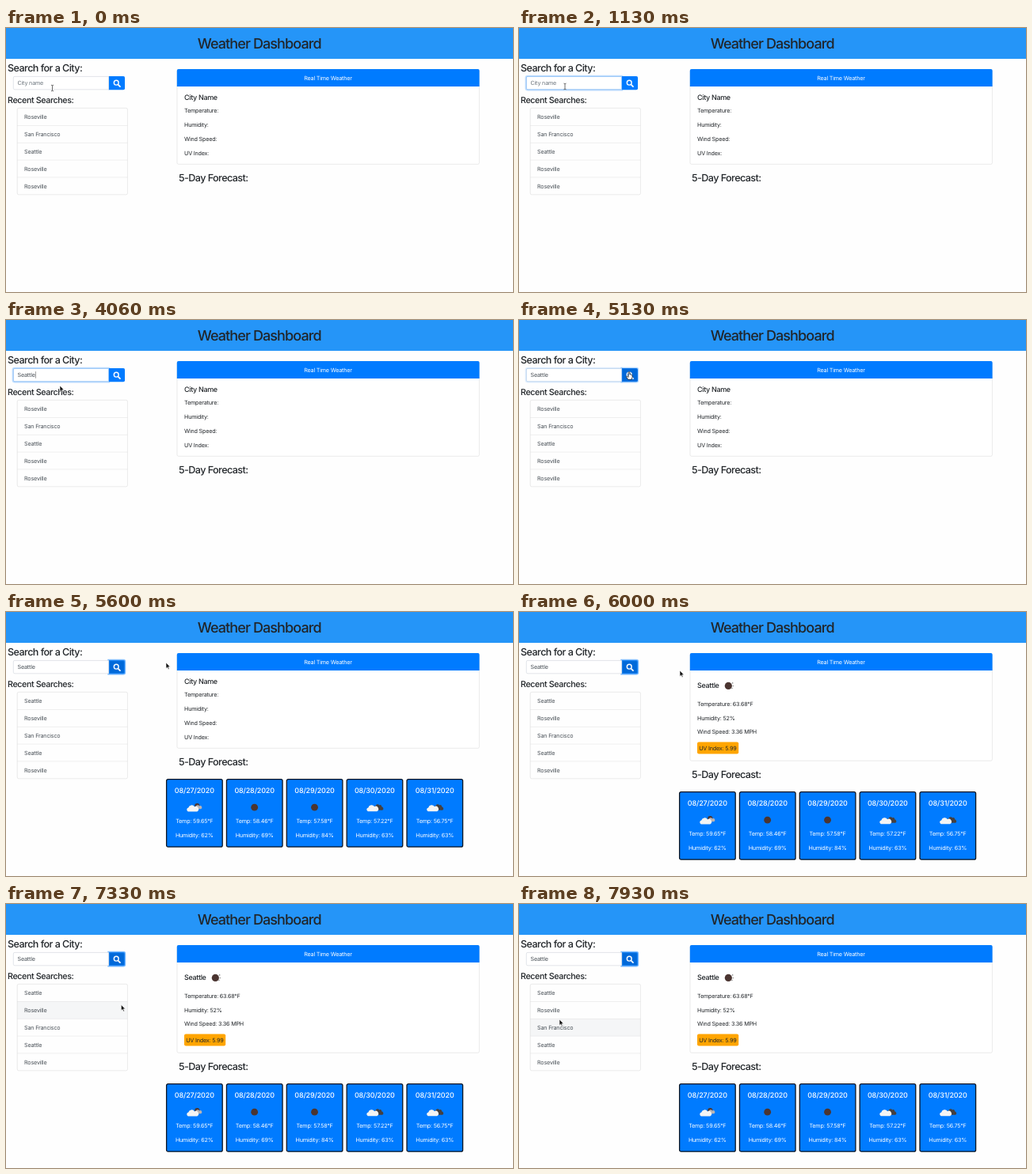
Animation of 640 by 334 pixels, one loop 8000 ms. Source, as an HTML page:

```html
<!DOCTYPE html>
<html lang="en">
<head>
<meta charset="utf-8">
<title>Weather Dashboard</title>
<style>
html, body { margin: 0; width: 100%; height: 100%; overflow: hidden; background: #fefefe; }
svg { display: block; width: 100vw; height: 100vh; }
text {
  font-family: Inter, "Open Sans", sans-serif;
  font-optical-sizing: none;
  text-rendering: geometricPrecision;
  white-space: pre;
}
.h1 { font-size: 18px; font-weight: 500; letter-spacing: -.05em; }
.h3 { font-size: 12.57px; font-weight: 500; letter-spacing: -.044em; }
.h4 { font-size: 10.78px; font-weight: 500; letter-spacing: -.04em; }
.h5 { font-size: 8.98px; font-weight: 500; letter-spacing: -.037em; }
.date { font-size: 8.98px; font-weight: 500; letter-spacing: -.015em; }
.body { font-size: 7.19px; letter-spacing: -.027em; }
</style>
</head>
<body>
<svg id="stage" viewBox="0 0 640 334"></svg>
<script>
const LOOP = 8000;
const FOCUS_INPUT = 160, HIDE_MOUSE = 2260, SHOW_MOUSE = 4060;
const CLICK = 5050, LIST_UPDATE = 5260, FORECAST = 5460, CURRENT = 5700;
const KEYS = [2260, 2600, 2800, 2930, 3260, 3460, 3600];
const CITY = 'Seattle';
const BLUE = '#007bff', INK = '#212529', GREY = '#495057', BROWN = '#4b3531';

const RECENT = ['Roseville', 'San Francisco', 'Seattle', 'Roseville', 'Roseville'];
const RECENT_AFTER = [CITY, ...RECENT.slice(0, 4)];
const DAYS = [
  ['08/27/2020', 'partly', '59.65', 62],
  ['08/28/2020', 'clear', '58.46', 69],
  ['08/29/2020', 'clear', '57.58', 84],
  ['08/30/2020', 'cloudy', '57.22', 63],
  ['08/31/2020', 'cloudy', '56.75', 63],
];

// Pointer path: time, x, y
const PATH = [
  [0, 58.5, 76], [60, 58.5, 76], [460, 57, 73], [4060, 68, 83], [4260, 70, 87],
  [4460, 73, 87], [4600, 76, 86], [4900, 133, 70], [5000, 139, 66], [5330, 139, 66],
  [5600, 202, 64], [6000, 203, 74], [6260, 196, 93], [6660, 178.5, 115],
  [7130, 163, 124], [7930, 51, 146], [8000, 51, 146],
];

const clamp = v => Math.max(0, Math.min(1, v));
const ease = v => v * v * (3 - 2 * v);
const fade = (t, start) => ease(clamp((t - start) / 150));

function pointerAt(t) {
  const i = Math.max(1, PATH.findIndex(p => p[0] > t));
  const [a, b] = [PATH[i - 1], PATH[i]];
  const k = ease(clamp((t - a[0]) / (b[0] - a[0])));
  return { x: a[1] + (b[1] - a[1]) * k, y: a[2] + (b[2] - a[2]) * k };
}

const inside = (p, x, y, w, h) => p.x >= x && p.x < x + w && p.y >= y && p.y < y + h;
const text = (cls, x, y, s, fill = INK, anchor = 'start') =>
  `<text class="${cls}" x="${x}" y="${y}" fill="${fill}" text-anchor="${anchor}">${s}</text>`;
const rect = (x, y, w, h, fill, more = '') =>
  `<rect x="${x}" y="${y}" width="${w}" height="${h}" fill="${fill}" ${more}/>`;
const path = (d, more) => `<path d="${d}" ${more}/>`;
const at = (x, y, s) => `<g transform="translate(${x} ${y})">${s}</g>`;

const cloud = fill => path('M-6 4A2.5 2.5 0 0 1-5.5-.8 4.2 4.2 0 0 1 2.2-2 3.2 3.2 0 0 1 5.5 4Z', `fill="${fill}"`);
const ball = r => `<circle r="${r}" fill="${BROWN}"/>`;
const small = (x, y, s) => `<g transform="translate(${x} ${y}) scale(.62)">${s}</g>`;
const ICONS = {
  clear: ball(4.4),
  partly: small(3.5, -2.2, ball(5)) + small(5, -.5, cloud('#b9b4b4')) + at(-2, 1.2, cloud('#f4f4f4')),
  cloudy: small(4.5, -1.5, cloud('#45403f')) + small(6.5, 1, cloud('#45403f')) + at(-2.5, 1, cloud('#f4f4f4')),
};

const CURSORS = {
  arrow: path('M0 0V7.4L1.7 5.9 2.9 8.5 4.1 8 2.9 5.4H5.2Z', 'fill="#111" stroke="#fff" stroke-width=".6"'),
  beam: path('M-1.5-3.8Q0-3.8 0-2.8Q0-3.8 1.5-3.8M0-2.8V2.8M-1.5 3.8Q0 3.8 0 2.8Q0 3.8 1.5 3.8',
    'fill="none" stroke="#444" stroke-width=".8"'),
  hand: path('M-.9 0Q0-1.1.9 0V3Q2 2.4 2.5 3.3 3.6 2.9 4 4V6.5L3 9.3H-1.3L-3.7 5.8Q-3.3 4.6-2 5.5L-.9 6.4Z',
    'fill="#fff" stroke="#111" stroke-width=".7"'),
};

function caretOn(t) {
  const last = KEYS.filter(k => k <= t).pop() ?? FOCUS_INPUT;
  return t >= FOCUS_INPUT && t < CLICK && (t - last) % 1000 < 500;
}

function searchBox(t, pointer) {
  const typed = CITY.slice(0, KEYS.filter(k => k <= t).length);
  const inputFocus = fade(t, FOCUS_INPUT) * (1 - fade(t, CLICK));
  const buttonFocus = fade(t, CLICK);
  const hover = inside(pointer, 129.5, 61, 20.5, 17);
  const button = 'M129.5 61H148.2Q150 61 150 62.8V76.4Q150 78.2 148.2 78.2H129.5Z';
  const field = 'M129.5 61.4H11Q9.3 61.4 9.3 63V76.2Q9.3 77.8 11 77.8H129.5Z';
  const caret = caretOn(t) ? '<tspan fill="#222" dx="-.5" font-weight="300">|</tspan>' : '';
  return path(button, `fill="${t >= CLICK || hover ? '#0069d9' : BLUE}"`)
    + path(button, `fill="none" stroke="#268fff" stroke-width="2.4" opacity="${buttonFocus * .6}"`)
    + path('M142 72.2L144 74.2', 'stroke="#fff" stroke-width="1.7" stroke-linecap="round"')
    + '<circle cx="139.2" cy="69.2" r="2.9" fill="none" stroke="#fff" stroke-width="1.4"/>'
    + path(field, `fill="#fff" stroke="${BLUE}" stroke-width="3.3" stroke-opacity="${inputFocus * .25}"`)
    + path(field, 'fill="#fff" stroke="#ced4da" stroke-width=".6"')
    + path(field, `fill="none" stroke="#80bdff" stroke-width=".7" opacity="${inputFocus}"`)
    + (typed ? text('body', 14.5, 72.4, typed + caret, GREY)
      : text('body', 14.5, 72.4, 'City name', '#6c757d')
        + (caret ? rect(14.2, 66, .5, 7.5, '#222') : ''));
}

function recentList(t, pointer) {
  const step = 21.9, top = 101.3;
  return (t < LIST_UPDATE ? RECENT : RECENT_AFTER).map((city, i) => {
    const y = top + i * step;
    const hover = t >= SHOW_MOUSE && inside(pointer, 14, y, 139.5, step);
    return (hover ? rect(14, y, 139.5, step, '#f5f6f7') : '')
      + (i ? rect(14, y - .2, 139.5, .5, '#dfdfdf') : '')
      + text('body', 23, y + 14, city, GREY);
  }).join('') + rect(14.2, top, 139.2, 5 * step, 'none', 'rx="1.8" stroke="#dcdcdc" stroke-width=".6"');
}

function currentWeather(loaded) {
  const rows = loaded
    ? ['Temperature: 63.68°F', 'Humidity: 52%', 'Wind Speed: 3.36 MPH']
    : ['Temperature:', 'Humidity:', 'Wind Speed:', 'UV Index:'];
  const first = loaded ? 118.7 : 107.2;
  const head = loaded
    ? text('h5', 225, 96.3, CITY)
      + at(264.3, 93.4, ball(4.6) + path('M4.5-3.5h1.5M5.5.2h1M4.2 3h1', 'stroke="#555" stroke-width="1"'))
      + rect(225, 164.4, 52.2, 15, '#ffa500', 'rx="2"') + text('body', 227.2, 174.5, 'UV Index: 5.99')
    : text('h5', 225, 91.4, 'City Name');
  return rect(216, 52.3, 381.4, loaded ? 135.9 : 120, '#fff', 'rx="1.8" stroke="#dcdcdc" stroke-width=".6"')
    + path('M215.8 74V54Q215.8 52 217.8 52H595.6Q597.6 52 597.6 54V74Z', `fill="${BLUE}"`)
    + text('body', 406.5, 65.6, 'Real Time Weather', '#fff', 'middle')
    + head + rows.map((row, i) => text('body', 225, first + i * 17.85, row)).join('');
}

function forecast(t) {
  if (t < FORECAST) return '';
  return DAYS.map(([date, icon, temp, humidity], i) => at(202 + i * 75.85, 211,
    rect(.6, .6, 70.6, 85.6, BLUE, 'rx="2" stroke="#0b1420" stroke-width="1.3"')
    + text('date', 35.8, 18.3, date, '#fff', 'middle')
    + at(35.8, 36.2, ICONS[icon])
    + text('body', 35.8, 56.3, `Temp: ${temp}°F`, '#fff', 'middle')
    + text('body', 35.8, 74.2, `Humidity: ${humidity}%`, '#fff', 'middle'))).join('');
}

function mouse(t, p) {
  if (t >= HIDE_MOUSE && t < SHOW_MOUSE) return '';
  const kind = inside(p, 129.5, 61, 20.5, 17) ? 'hand' : inside(p, 9, 61, 120.5, 17) ? 'beam' : 'arrow';
  return at(p.x, p.y, CURSORS[kind]);
}

function scene(t) {
  const pointer = pointerAt(t), loaded = t >= CURRENT;
  return rect(0, 0, 640, 39, '#2595f8')
    + text('h1', 319.7, 26.3, 'Weather Dashboard', INK, 'middle')
    + text('h3', 2, 55, 'Search for a City:')
    + searchBox(t, pointer)
    + text('h4', 2, 95.4, 'Recent Searches:')
    + recentList(t, pointer)
    + currentWeather(loaded)
    + at(0, loaded ? 16 : 0, text('h3', 218, 193.6, '5-Day Forecast:') + forecast(t))
    + mouse(t, pointer);
}

const stage = document.getElementById('stage');
const start = performance.now();
function draw() {
  stage.innerHTML = scene((performance.now() - start) % LOOP);
  requestAnimationFrame(draw);
}
draw();
</script>
</body>
</html>
```
